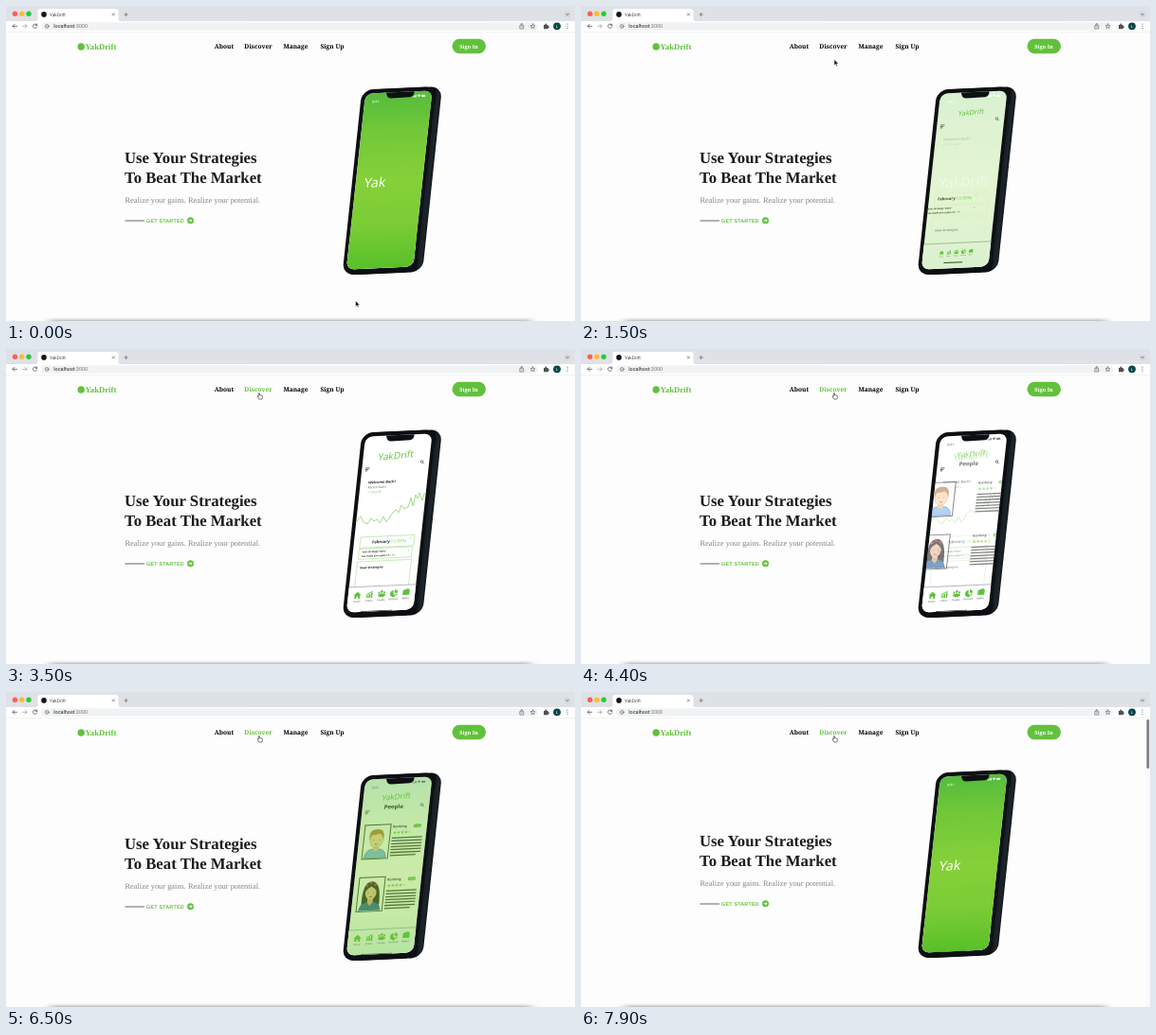
An HTML page that plays this animation: 600 px wide and 333 px high, repeating every 8000 ms.

```html
<!DOCTYPE html>
<html lang="en">
<head>
<meta charset="utf-8">
<title>YakDrift</title>
<style>
html, body { margin: 0; width: 100%; height: 100%; overflow: hidden; background: #fdfdfd; }
svg { display: block; width: 600px; height: 333px; text-rendering: geometricPrecision; }
.serif { font-family: "Liberation Serif", serif; }
.nav { font: 600 6.6px "Noto Serif", serif; text-anchor: middle; }
.sans { font-family: "Liberation Sans", sans-serif; }
.open { font-family: "Open Sans", sans-serif; }
.ui { font-family: Roboto, sans-serif; }
.line { fill: none; stroke: #555; stroke-width: .8; stroke-linecap: round; stroke-linejoin: round; }
.thin { stroke-width: .6; }
</style>
</head>
<body>
<svg viewBox="0 0 600 333">
  <defs>
    <linearGradient id="lime" x1="0" y1="0" x2="0" y2="1">
      <stop offset="0" stop-color="#55bc3c"/><stop offset=".22" stop-color="#72c838"/>
      <stop offset=".5" stop-color="#86d039"/><stop offset=".75" stop-color="#7bcc35"/>
      <stop offset="1" stop-color="#58c029"/>
    </linearGradient>
    <linearGradient id="side"><stop offset=".9" stop-color="#0b0d10"/><stop offset=".96" stop-color="#1e272e"/><stop offset="1" stop-color="#10161b"/></linearGradient>
    <filter id="soft" x="-10%" y="-200%" width="120%" height="500%"><feGaussianBlur stdDeviation="5 1.6"/></filter>
    <clipPath id="glass"><rect width="70.5" height="188" rx="8" transform="matrix(1 -.045 -.107 .99 379 92.5)"/></clipPath>
  </defs>
  <rect width="600" height="333" fill="#fdfdfd"/>

  <g id="hero">
    <g class="serif">
      <g font-size="16.75" font-weight="700" fill="#1c1c1c">
        <text x="125" y="166">Use Your Strategies</text>
        <text x="125" y="186.7">To Beat The Market</text>
      </g>
      <text x="125.5" y="208.3" font-size="8.4" fill="#858585">Realize your gains. Realize your potential.</text>
    </g>
    <path d="M125.5 227H146" stroke="#555" stroke-width=".9"/>
    <text class="sans" x="148" y="229" font-size="5.4" font-weight="700" letter-spacing=".2" fill="#62c13c">GET STARTED</text>
    <circle cx="194.5" cy="226.8" r="3.5" fill="#62c13c"/>
    <path d="M192.5 226.8h3.6m-1.5-1.6l1.6 1.6-1.6 1.6" fill="none" stroke="#fff" stroke-width=".9"/>

    <g transform="matrix(1 -.045 -.105 .99 379 93)">
      <rect x="2" y="-4.5" width="78.5" height="198" rx="12" fill="url(#side)"/>
      <rect x="-4.2" y="-4.8" width="78.6" height="198" rx="12" fill="#0d1013"/>
      <path d="M74.6 14V180" stroke="#2b343c" stroke-width=".5"/>
    </g>
    <g clip-path="url(#glass)">
      <rect x="350" y="80" width="110" height="210" fill="#fff"/>
      <g id="home"></g>
      <g id="people"></g>
      <g id="tools"></g>
      <g id="splash">
        <rect width="72" height="189" fill="url(#lime)" transform="matrix(1 -.045 -.11 .99 379 92.5)"/>
        <g id="lightStatus"></g>
      </g>
      <text id="typed" class="open" transform="matrix(1 -.045 -.16 .99 377 192)" font-size="14.2" fill="#fff"></text>
      <path d="M400 88l31-1.4-.6 5.2q-.7 4-4.4 4.4l-19.6 1.2q-4.5.2-5-4z" fill="#0d1013"/>
    </g>
  </g>

  <g id="bar" display="none">
    <rect x="595" y="28" width="5" height="305" fill="#fafafa"/>
    <rect x="596.4" y="29" width="2.8" height="52" rx="1.4" fill="#7f7f7f"/>
  </g>
  <rect y="27" width="594" height="30" fill="#fdfdfd"/>
  <circle cx="79.2" cy="43" r="3.7" fill="#62c13c"/>
  <text class="serif" x="83.5" y="46.3" font-size="8.7" font-weight="700" fill="#62c13c">YakDrift</text>
  <g class="nav">
    <text x="230" y="45">About</text>
    <text id="discover" x="266" y="45">Discover</text>
    <text x="305.5" y="45">Manage</text>
    <text x="344" y="45">Sign Up</text>
    <rect x="470.5" y="34.8" width="35.5" height="15.4" rx="7.7" fill="#62c13c"/>
    <text x="488" y="44.6" font-size="5.6" fill="#fff">Sign In</text>
  </g>

  <g class="ui">
    <rect width="600" height="17" fill="#dee1e6"/>
    <circle cx="9.5" cy="8.3" r="2.7" fill="#fc5f57"/>
    <circle cx="16.7" cy="8.3" r="2.7" fill="#fdbc2e"/>
    <circle cx="24" cy="8.3" r="2.7" fill="#28c840"/>
    <path d="M31 16q2.5 0 2.5-2.5v-8q0-2.5 2.5-2.5h80q2.5 0 2.5 2.5v8q0 2.5 2.5 2.5z" fill="#fff"/>
    <rect y="16" width="600" height="11.5" fill="#fff"/>
    <path d="M0 27.6H600" stroke="#e3e5e8" stroke-width=".5"/>
    <circle cx="40" cy="8.9" r="2.8" fill="#151515"/>
    <text x="46" y="10.6" font-size="4.8" fill="#3c4043">YakDrift</text>
    <path class="line thin" d="M112.2 7.8l2.2 2.2m0-2.2l-2.2 2.2M124.800 9h3.600m-1.800-1.800v3.600"/>
    <circle cx="592" cy="8.8" r="3.400" fill="#d5d8dd"/>
    <path class="line" d="M590.7 8.300l1.3 1.300 1.3-1.300"/>
    <path class="line" d="M11.5 21.3H7m2-2l-2 2 2 2"/>
    <path class="line" d="M17.5 21.3H22m-2-2l2 2-2 2" stroke-opacity=".5"/>
    <path class="line" d="M32.5 20a2.200 2.200 0 1 0 .2 2m0-3v1.400h-1.600"/>
    <rect x="37" y="17.2" width="524" height="8.6" rx="4.300" fill="#f0f2f3"/>
    <circle class="line thin" cx="43.2" cy="21.4" r="1.900"/>
    <path d="M43.2 21.1v1.300m0-2.100v.4" stroke="#555" stroke-width=".5"/>
    <text x="50.3" y="23.2" font-size="5.45" fill="#222">localhost<tspan fill="#777">:3000</tspan></text>
    <path class="line thin" d="M542.6 20.6h-.8V24h4v-3.400h-.8m-1.200 1.600v-3.500m-1.100 1l1.100-1.100 1.100 1.100"/>
    <path id="mark" class="line thin"/>
    <path d="M567 20h1.300q0-1.400 1-1.400t1 1.400h1.400v1.300q1.200 0 1.200 1t-1.200 1v1H567z" fill="#4d5156"/>
    <circle cx="581" cy="21.3" r="3.9" fill="#07494b"/>
    <text x="581" y="22.9" font-size="4.2" fill="#fff" text-anchor="middle">L</text>
    <path d="M592 19.1v.01m0 2.200v.01m0 2.200v.01" stroke="#555" stroke-width="1.1" stroke-linecap="round"/>
  </g>
  <rect x="46" y="331.500" width="508" height="5" fill="#777" opacity=".55" filter="url(#soft)"/>

  <g id="cursor">
    <path id="arrow" d="M0 0V6.300L1.500 5l1 2.200 1-.5-1-2.100h2z" fill="#111" stroke="#fff" stroke-width=".5"/>
    <path id="hand" d="M-.7.300q.7-.7 1.200 0v2q1.300-.2 2.800.6.300 2-.5 3.600h-3.100Q-1.300 4.900-2 3.500q.5-.7 1.300.2z" fill="#fff" stroke="#222" stroke-width=".6"/>
  </g>
</svg>
<script>
const LOOP = 8000, NAME = "YakDrift", GREEN = "#62c13c";
const $ = id => document.getElementById(id);
const ramp = (t, a, b) => Math.min(1, Math.max(0, (t - a) / (b - a)));
const ease = p => p * p * (3 - 2 * p);
const show = (id, on) => $(id).setAttribute("display", on ? "inline" : "none");
const fade = (id, v) => $(id).setAttribute("opacity", v);
const move = (id, x, y) => $(id).setAttribute("transform", `translate(${x} ${y})`);
const zoom = (id, x, y, k) => $(id).setAttribute("transform", `translate(${x} ${y}) scale(${k}) translate(${-x} ${-y})`);

// Content lying on the tilted phone screen
const tilt = (x, y, body) => `<g transform="matrix(1 -.045 -.11 .99 ${x} ${y})">${body}</g>`;
const label = (x, y, size, text, fill = "#222", weight = 700) =>
  tilt(x, y, `<text class="open" font-size="${size}" font-weight="${weight}" fill="${fill}">${text}</text>`);
const frame = (x, y, w, h) =>
  tilt(x, y, `<rect width="${w}" height="${h}" fill="none" stroke="#a5dc8c" stroke-width=".6"/>`);
const brand = (x, y, size) =>
  `<text class="open" font-size="${size}" fill="${GREEN}" transform="matrix(1 -.1 -.16 .99 ${x} ${y})">${NAME}</text>`;

function star(x, y, r) {
  let d = "";
  for (let i = 0; i < 10; i++) {
    const a = i * Math.PI / 5, k = i % 2 ? r * .45 : r;
    d += (i ? "L" : "M") + (x + k * Math.sin(a)).toFixed(2) + " " + (y - k * Math.cos(a)).toFixed(2);
  }
  return d + "Z";
}

const status = fill => label(386, 102.5, 3.6, "9:41", fill, 600) +
  tilt(429, 96.5, `<g transform="scale(.88)"><path d="M0 0v-1m1.3 1v-1.7m1.3 1.7v-2.4m1.3 2.4v-3" stroke="${fill}" stroke-width=".9"/>
    <path d="M5.3-2.2q2-1.6 4 0l-2 2.3z" fill="${fill}"/><rect x="10.3" y="-2.6" width="4.6" height="2.5" rx=".7" fill="${fill}"/></g>`);

const chart = "M368 184l3-3 3-4 3 6 4 2 4-6 3 3 3-2 3 4 4-7 3 6 3-4 3-5 4-4 3 3 3-8 3 4 4-2 3-10 2 9 3-12 2 4 2-6 3 8 2-7 3-1 3-2";

$("home").innerHTML = `<g id="logo">${brand(392, 118, 10.2)}</g>
  <g id="welcome">${label(382, 142.5, 3.8, "Welcome Back!")}${label(381.5, 147.5, 3.2, "Recent Gains", "#555", 400)}</g>
  <g id="chart">${label(381, 152.5, 3.2, "+ 1023.95", GREEN, 400)}
    <path d="${chart}" fill="none" stroke="#a3dc87" stroke-width="1"/></g>
  <g id="frames">${frame(374, 199, 57, 11.5)}${frame(372.5, 211.5, 56, 11)}${frame(370.5, 225, 57, 35)}</g>
  <g id="cards">
    ${label(386, 205.5, 4.1, `February <tspan fill="${GREEN}" font-weight="400">(12.83%)</tspan>`)}
    ${label(375.5, 215.5, 2.5, "Your Strategy “Auto”")}
    ${label(375, 220, 2.5, `has made you a gain of <tspan fill="${GREEN}">7.3%</tspan>`)}
    ${label(425.5, 201, 3.5, "›", GREEN)}${label(424, 214, 3.5, "›", GREEN)}</g>
  <g id="fresh">${label(373, 232.5, 3.3, "New Strategies")}</g>`;

const male = `
  <path d="M2 37q1-9 8-10h8q7 1 8 10z" fill="#78b3ee" stroke="#345" stroke-width=".5"/>
  <path d="M11 22h6v6q-3 3-6 0z" fill="#f0b98b"/>
  <ellipse cx="14" cy="17" rx="7" ry="8.5" fill="#ffd2a8" stroke="#a86a3c" stroke-width=".4"/>
  <path d="M6.5 17Q4 5 13 5q10-1 8.5 12-1-6-5-7-6 2-8 1-1 2-2 6z" fill="#b97a3c"/>
  <path d="M11 16.5v1m6-1v1m-4.5 4q1.5 1.2 3 0" fill="none" stroke="#533" stroke-width=".8"/>`;
const female = `
  <path d="M5 33Q3 5 14 4.5 25 5 24 33z" fill="#20191c"/>
  <path d="M2 37q1-8 8-9h8q7 1 8 9z" fill="#1f5f9f"/>
  <path d="M11 22h6v6l-3 4-3-4z" fill="#dfa27c"/>
  <ellipse cx="14" cy="17" rx="6" ry="8" fill="#f2bd95"/>
  <path d="M8 16q0-8 6-9 6 1 6 9-2-4-6-6-4 2-6 6z" fill="#20191c"/>
  <path d="M8 8h2.5v2H8zm4-2.5h2.5v2H12zm5 2h2.5v2H17z" fill="#c33a34"/>
  <path d="M11 16.5v1m6-1v1m-4.5 4q1.5 1 3 0" fill="none" stroke="#533" stroke-width=".8"/>`;

const portrait = (x, y, body) => tilt(x, y,
  `<g transform="scale(.97 .96)"><rect width="28" height="38" fill="#fff"/>${body}<rect width="28" height="38" fill="none" stroke="#333" stroke-width="1"/></g>`);

function ranking(x, y) {
  let stars = "", lines = "";
  for (let i = 0; i < 4; i++) stars += star(2.5 + i * 4, 5.3, 2);
  for (let i = 0; i < 7; i++) lines += `M0 ${11 + i * 3.1}h${i > 5 ? 27 : 32}`;
  return label(x, y, 3.6, "Ranking") + tilt(x, y,
    `<path d="${stars}" fill="#7ccb55"/><path d="${star(18.3, 5.3, 1.5)}" fill="#b9dfa6"/>
    <path d="${lines}" stroke="#333" stroke-width="1.3"/>
    <rect x="21.5" y="-3" width="8.5" height="3.8" rx="1.9" fill="${GREEN}"/>
    <text class="open" x="23" y="-.2" font-size="2.1" fill="#fff">Follow</text>`);
}

$("people").innerHTML = status("#222") + brand(396, 115, 8.3) +
  label(398.5, 123.7, 6, "People", "#111") +
  `<g id="faces">${portrait(379, 141, male)}${portrait(373, 196.5, female)}</g>
  <g id="ranks">${ranking(408, 143.5)}${ranking(402, 199.5)}</g>`;

const icons = [
  ["Home", "M0-4.5L4.5-.5H3.2v4H1V1h-2v2.5h-2.2v-4h-1.300z"],
  ["Charts", "M-3.5.5h1.800v3h-1.800zm2.600-1.500h1.800v4.500h-1.800zm2.600-1.500h1.800v6h-1.800zM-4-.5L3-4.500l.4.800L-3.600.3z"],
  ["People", "M-1.500-3a1.500 1.500 0 1 1 3 0 1.500 1.500 0 1 1-3 0M-4.300-1.700a1.200 1.200 0 1 1 2.400 0 1.200 1.200 0 1 1-2.400 0M1.900-1.700a1.200 1.200 0 1 1 2.400 0 1.200 1.200 0 1 1-2.400 0M-4.500 2.500q0-3 2.500-2.700 2-1.200 4 0 2.500-.3 2.500 2.700H2.700v1h-5.400v-1z"],
  ["Portfolio", "M-.5-3.500V.5l3 2.800A4 4 0 1 1-.5-3.500zM.8-4.300A4 4 0 0 1 4.500-.3H.8zM1.500.8h3L3.500 3z"],
  ["Wallet", "M-3.500-2.500l6-2 1 1.500h.8v6h-8z"]
];
$("tools").innerHTML =
  tilt(361, 252, '<rect x="-4" width="82" height="30" fill="#fff"/><path d="M0 0H74" stroke="#8a8a8a" stroke-width=".6"/>') +
  '<g id="dock">' + icons.map(([name, d], i) => tilt(370.5 + i * 12.8, 260.8 - i * .9,
    `<path d="${d}" fill="#62c13c" transform="scale(.9)"/><text class="open" y="7.2" font-size="2.6" text-anchor="middle" fill="#444">${name}</text>`)).join("") +
  tilt(374, 278, '<path d="M0 0h33" stroke="#222" stroke-width="1.6"/>') + "</g>" +
  tilt(379, 126, '<path d="M0 0h4.5M0 1.500h3.500M0 3h2.500" stroke="#333" stroke-width=".7"/>') +
  tilt(438.5, 119, '<circle r="1.3" fill="none" stroke="#333" stroke-width=".6"/><path d="M1 1l1.300 1.300" stroke="#333" stroke-width=".7"/>');
$("lightStatus").innerHTML = status("#fff");
$("mark").setAttribute("d", star(555.5, 21.5, 2.6));

function draw(t) {
  // Phone screens
  const green = t < 4000 ? 1 - ramp(t, 1200, 1590) : ramp(t, 6350, 6700);
  const swap = ramp(t, 4050, 4650);
  const enter = 1 - ease(ramp(t, 1500, 1850));
  fade("home", 1 - swap);
  fade("welcome", ramp(t, 1400, 1900));
  fade("chart", ramp(t, 1700, 2600));
  fade("frames", ramp(t, 1450, 1900));
  fade("fresh", ramp(t, 1300, 1700));
  zoom("logo", 412, 112, 1 - .28 * enter);
  zoom("dock", 395, 262, 1 - .4 * enter);
  move("cards", -10 * enter, 0);
  move("fresh", 0, 6 * enter);
  fade("people", swap);
  move("faces", -26 * (1 - swap), 1.5 * (1 - swap));
  move("ranks", 26 * (1 - swap), -2 * (1 - swap));
  fade("splash", green);

  const count = t < 4000 ? 3 + Math.floor(t / 150) : Math.floor((t - 7250) / 200);
  $("typed").textContent = NAME.slice(0, Math.max(0, count));
  fade("typed", t < 4000 ? 1 - ramp(t, 1300, 1700) : 1);

  // Pointer and hover
  const trip = ease(ramp(t, 200, 1350)), rise = ease(ramp(t, 1650, 1950));
  const y = 311.5 - 255 * trip - 10 * rise;
  move("cursor", 368.5 - 101.5 * trip, y);
  const over = y < 50;
  show("arrow", !over);
  show("hand", over);
  $("discover").setAttribute("fill", over ? GREEN : "#000");

  // Page scroll
  const pull = ramp(t, 7650, 7900);
  move("hero", 0, -3 * pull * pull);
  show("bar", t >= 7600);
}

function tick(now) {
  draw(now % LOOP);
  requestAnimationFrame(tick);
}
draw(0);
requestAnimationFrame(tick);
</script>
</body>
</html>
```
